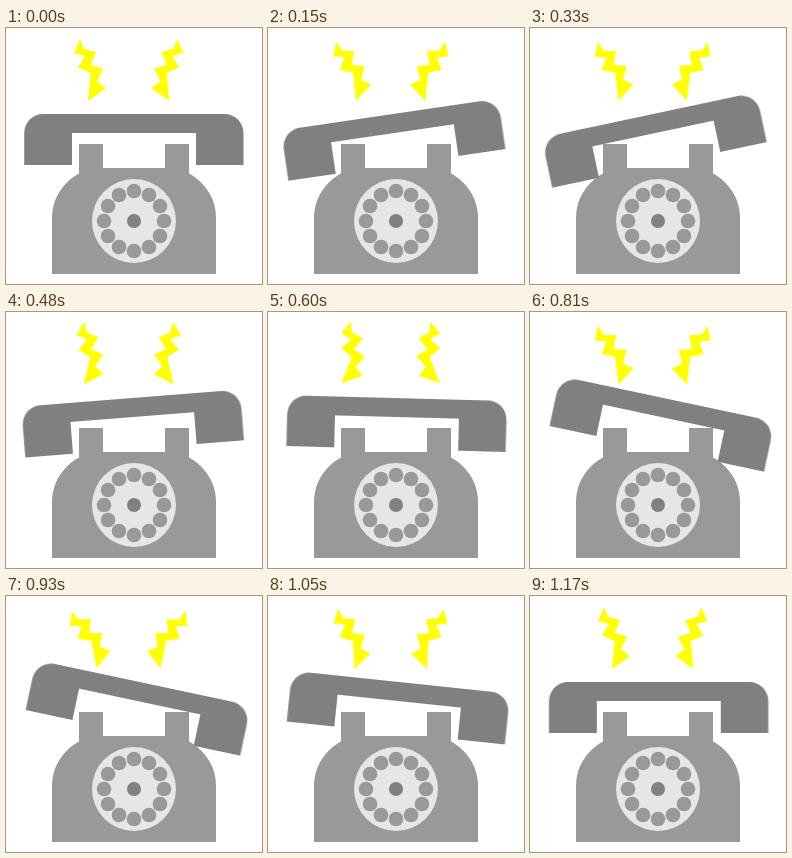
Recreate the animation shown at these times as an HTML page. Size 256 px wide and 256 px high, loop 1200 ms.

```html
<!DOCTYPE html>
<html lang="en">
<head>
<meta charset="utf-8">
<title>Ringing telephone</title>
<style>
  html, body { margin: 0; width: 100%; height: 100%; overflow: hidden; background: #fff; }
  svg { display: block; width: 100vw; height: 100vh; }

  .handset, .bolt { animation: 1200ms infinite; }
  .handset { transform-origin: 128px 129.5px; animation-name: rock; }
  .bolt { transform-origin: 84px 42px; animation-name: shake; }

  /* 30 ms per step */
  @keyframes rock {
    0%    { transform: translateX(0) rotate(0deg); animation-timing-function: steps(9); }
    22.5% { transform: translateX(0) rotate(-15deg); animation-timing-function: steps(20); }
    72.5% { transform: translateX(.6px) rotate(15deg); animation-timing-function: steps(10); }
    97.5%, 99.99% { transform: translateX(.8px) rotate(0deg); }
    100%  { transform: translateX(0) rotate(0deg); }
  }
  @keyframes shake {
    0%    { transform: rotate(0deg); animation-timing-function: steps(9); }
    22.5% { transform: rotate(-20deg); animation-timing-function: steps(10); }
    47.5% { transform: rotate(20deg); animation-timing-function: steps(10); }
    72.5% { transform: rotate(-20deg); animation-timing-function: steps(10); }
    97.5%, 100% { transform: rotate(0deg); }
  }
</style>
</head>
<body>
<svg viewBox="0 0 256 256">
  <defs>
    <path id="bolt" d="M74 11L78 21L90 24L84.5 37L97 40.5L91 53.5L100 60L82 73L84.5 45L72 39.5L79 28L68 25Z"/>
  </defs>

  <g fill="#999">
    <path d="M46 246V190A50 50 0 0 1 96 140H160A50 50 0 0 1 210 190V246Z"/>
    <path d="M73 116h24v32h-24zM159 116h24v32h-24z"/>
  </g>
  <circle cx="128" cy="193" r="42" fill="#e6e6e6"/>
  <g id="holes" fill="#999"></g>
  <circle cx="128" cy="193" r="7" fill="#808080"/>

  <path class="handset" fill="#808080"
    d="M18.2 137V105A19 19 0 0 1 37.2 86H218.5A19 19 0 0 1 237.5 105V137H190V105H66V137Z"/>

  <g fill="#ff0">
    <use class="bolt" href="#bolt"/>
    <g transform="matrix(-1 0 0 1 245.3 0)">
      <use class="bolt" href="#bolt"/>
    </g>
  </g>
</svg>
<script>
  const holes = document.getElementById('holes');
  for (let i = 0; i < 12; i++) {
    const a = i * Math.PI / 6;
    const hole = document.createElementNS('http://www.w3.org/2000/svg', 'circle');
    hole.setAttribute('cx', 128 + 30 * Math.cos(a));
    hole.setAttribute('cy', 193 + 30 * Math.sin(a));
    hole.setAttribute('r', 7.3);
    holes.append(hole);
  }
</script>
</body>
</html>
```
